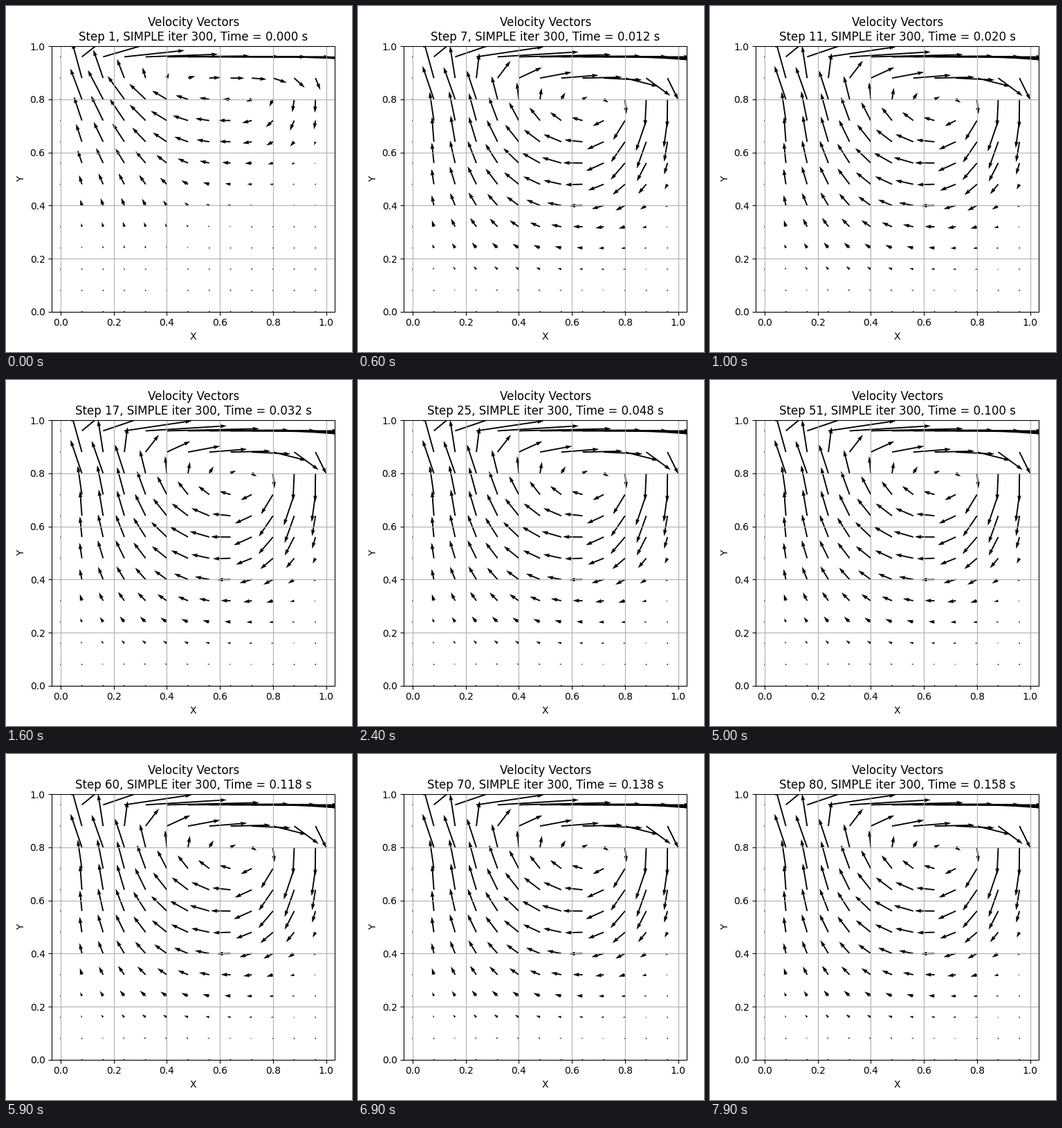
Write a matplotlib script that moves like this. It is 500 by 500 pixels and loops after 8 s.

```python
import numpy as np
import matplotlib.pyplot as plt
from matplotlib.animation import FuncAnimation

STEPS = 80
DT = 0.002
SETTLE = 1.6          # steps needed for the flow to relax by 1/e
LENGTH_SCALE = 410    # velocities below are in pixels of arrow length


def bell(t, center, width):
    return np.exp(-((t - center) / width) ** 2 / 2)


def arch(x, skew):
    """Zero at both side walls; a larger skew moves the crest to the right."""
    return np.sin(np.pi * x ** skew)


def flow(x, y, lid, lid_power, back, back_y, back_width, skew,
         corner, turn, rise, spread, sink, sink_y, sink_width):
    """Clockwise cavity vortex: lid jet, return flow, left rise and right sink."""
    jet = lid * y ** lid_power * arch(x, 1.5) ** (1 - 1.06 * y ** 14)
    u = (jet - back * bell(y, back_y, back_width) * arch(x, skew)
         - corner * bell(x, 0.16, 0.2) * bell(y, 0.86, 0.08)
         - turn * bell(x, 0.86, 0.07) * bell(y, 0.76, 0.05))

    up_x = 0.31 - 0.22 * y - 0.35 * y ** 10
    down_x = 0.67 + 0.32 * y
    down = sink * bell(y, sink_y, sink_width) * (1 - y ** 20)
    v = rise * bell(x, up_x, spread) - down * bell(x, down_x, 0.11)

    inside = (x > 0) & (y > 0)
    return u * inside, v * inside


axis = np.arange(13) * 0.08
x, y = np.meshgrid(axis, axis)

u_early, v_early = flow(
    x, y, lid=310, lid_power=17,
    back=23, back_y=0.74, back_width=0.2, skew=0.8,
    corner=12, turn=0,
    rise=70 * y ** 2, spread=0.19,
    sink=21, sink_y=0.82, sink_width=0.12)

u_late, v_late = flow(
    x, y, lid=245, lid_power=9,
    back=31, back_y=0.62, back_width=0.25,
    skew=np.minimum(1.5, 0.75 + 1.1 * y),
    corner=25, turn=10,
    rise=67 * y ** 1.5 + 5 * bell(y, 0.55, 0.12),
    spread=0.2 + 0.07 * bell(y, 0.73, 0.14),
    sink=47, sink_y=0.74, sink_width=0.18)

fig, ax = plt.subplots(figsize=(5, 5), dpi=100)
arrows = ax.quiver(x, y, u_early, v_early, scale=LENGTH_SCALE)
ax.set_xlabel("X")
ax.set_ylabel("Y")
ax.grid(True)
ax.set_aspect("equal", adjustable="datalim")
ax.set_xlim(0, 1)
ax.set_ylim(0, 1)
title = ax.set_title("")


def update(k):
    mix = 1 - np.exp(-k / SETTLE)
    arrows.set_UVC(u_early + (u_late - u_early) * mix,
                   v_early + (v_late - v_early) * mix)
    title.set_text("Velocity Vectors\n"
                   f"Step {k + 1}, SIMPLE iter 300, Time = {k * DT:.3f} s")
    return arrows, title


update(0)
fig.tight_layout()
anim = FuncAnimation(fig, update, frames=STEPS, interval=100, repeat=True)
plt.show()
```
